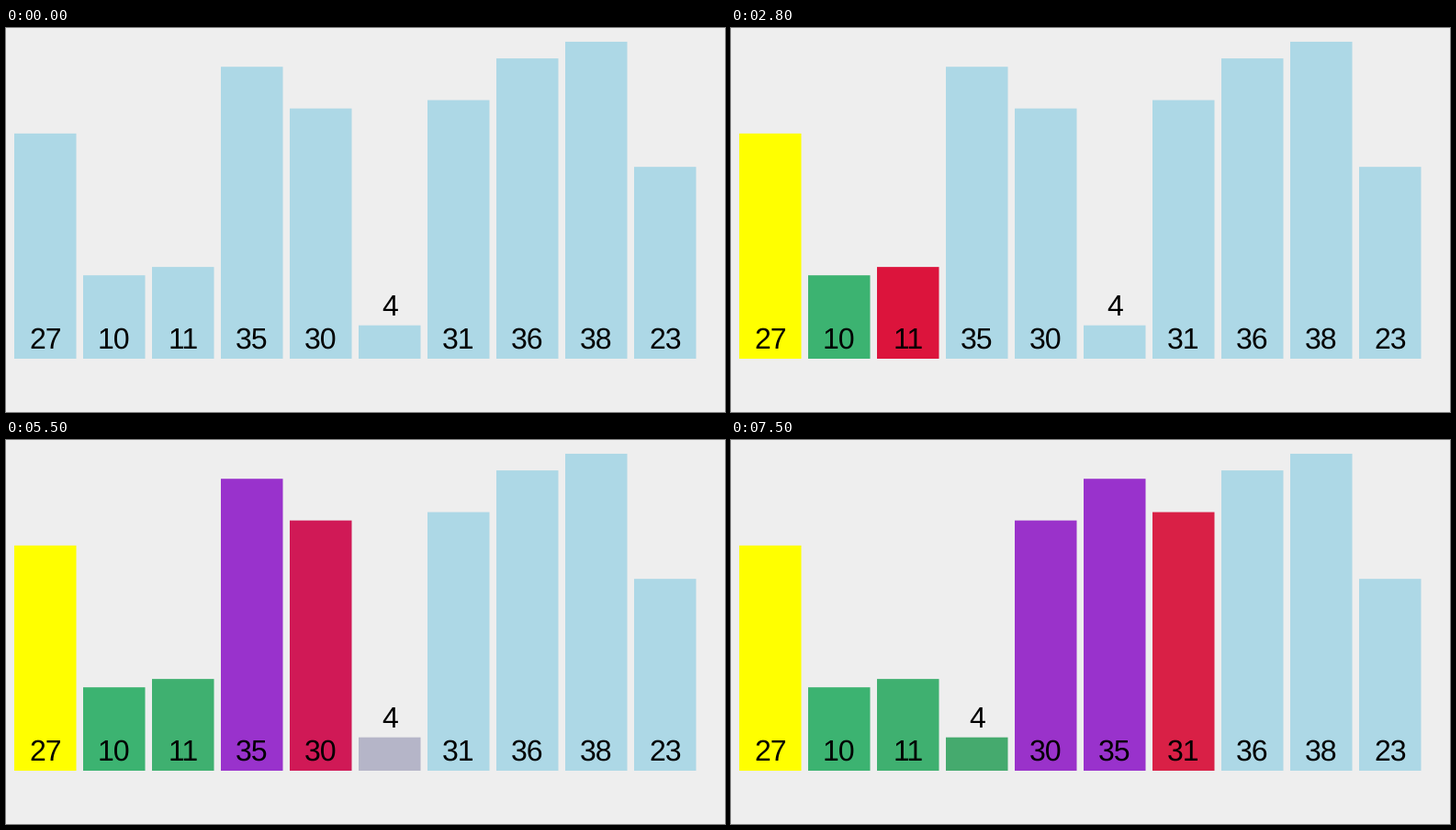
Recreate the animation shown at these times as a matplotlib script. Size 783 px wide and 418 px high, loop 8000 ms.

```python
import math

import matplotlib.pyplot as plt
import numpy as np
from matplotlib.animation import FuncAnimation
from matplotlib.colors import to_rgb
from matplotlib.patches import Rectangle

WIDTH, HEIGHT, DPI = 783, 418, 64
TICK, LOOP = 100, 8000
MOVE_TIME = 200

VALUES = [27, 10, 11, 35, 30, 4, 31, 36, 38, 23]
LEFT, PITCH, BAR_WIDTH = 9, 75, 67.5
BASE, UNIT = 360, 9.08
LABEL_PX, LABEL_GAP = 32, 11

IDLE, PIVOT, ACTIVE = "lightblue", "yellow", "crimson"
SMALLER, LARGER = "mediumseagreen", "darkorchid"

# Start time in ms, new bar colours, new bar slots.
MOVES = [
    (689, {0: PIVOT}, {}),
    (1637, {1: ACTIVE}, {}),
    (2585, {1: SMALLER, 2: ACTIVE}, {}),
    (3533, {2: SMALLER, 3: ACTIVE}, {}),
    (4481, {3: LARGER, 4: ACTIVE}, {}),
    (5429, {4: LARGER, 5: ACTIVE}, {}),
    (6377, {}, {3: 5, 5: 3}),
    (7349, {5: SMALLER, 6: ACTIVE}, {}),
]

plt.rcParams["text.hinting"] = "none"


def ease(t):
    """Cubic ease in and out, clamped to 0..1."""
    t = min(max(t, 0), 1)
    return 4 * t**3 if t < 0.5 else 1 - 4 * (1 - t) ** 3


def progress(now, start):
    # A nearly finished move rests at its last visible tick.
    rest = math.ceil((start + 0.7 * MOVE_TIME) / TICK) * TICK
    return ease((min(now, rest) - start) / MOVE_TIME)


def state(now):
    """Colours and slots of all bars at a time in ms."""
    colors = np.array([to_rgb(IDLE)] * len(VALUES))
    slots = np.arange(len(VALUES), dtype=float)
    for start, recolor, shift in MOVES:
        p = progress(now, start)
        for i, color in recolor.items():
            colors[i] += (np.array(to_rgb(color)) - colors[i]) * p
        for i, slot in shift.items():
            slots[i] += (slot - slots[i]) * p
    return colors, slots


fig = plt.figure(figsize=(WIDTH / DPI, HEIGHT / DPI), dpi=DPI, facecolor="#eeeeee")
ax = fig.add_axes([0, 0, 1, 1])
ax.set_xlim(0, WIDTH)
ax.set_ylim(HEIGHT, 0)
ax.axis("off")

bars, labels = [], []
for i, value in enumerate(VALUES):
    tall = value * UNIT
    bar = Rectangle((0, BASE - tall), BAR_WIDTH, tall, lw=0, snap=False, zorder=2 * i + 1)
    bars.append(ax.add_patch(bar))
    # Labels that do not fit inside a bar sit above it.
    floor = BASE if tall > 40 else BASE - tall
    labels.append(ax.text(0, floor - LABEL_GAP, str(value), ha="center", va="baseline",
                          family="Liberation Sans", size=LABEL_PX * 72 / DPI,
                          color="black", zorder=2 * i + 2))


def draw(frame):
    for bar, label, color, slot in zip(bars, labels, *state(frame * TICK)):
        x = LEFT + PITCH * slot
        bar.set_x(x)
        bar.set_facecolor(color)
        label.set_x(x + BAR_WIDTH / 2)
    return bars + labels


anim = FuncAnimation(fig, draw, frames=LOOP // TICK, interval=TICK,
                     repeat=True, repeat_delay=0)
plt.show()
```
